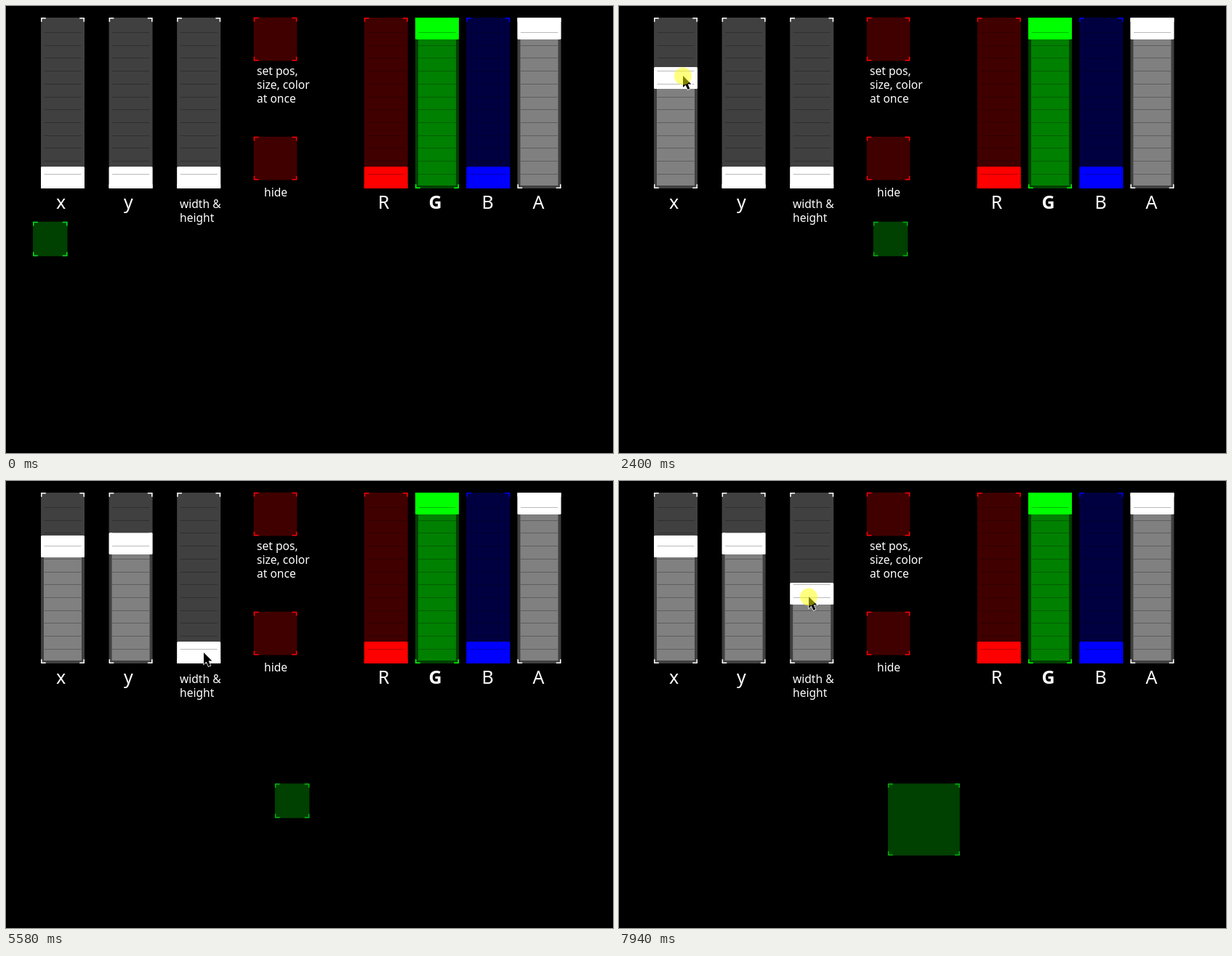
An HTML page with a canvas that plays this animation: 835x615 px, repeating every 8 s.

```html
<!DOCTYPE html>
<html>
<head>
<meta charset="utf-8">
<style>
html, body { margin: 0; width: 100%; height: 100%; overflow: hidden; background: #000; }
canvas { display: block; }
</style>
</head>
<body>
<canvas id="stage" width="835" height="615"></canvas>
<script>
const ctx = document.getElementById('stage').getContext('2d');
const LOOP = 8000, START = 460, TICK = 69.26;
const TOP = 16, BOTTOM = 251, HANDLE = 30, TRAVEL = 205;
const LEAD = 40; // the pointer runs this many ms ahead of the handle

const drags = [
  { slider: 'x', start: 1268, end: 2598, moved: 146, x: 88, soft: 1 },
  { slider: 'y', start: 3497, end: 4614, moved: 150, x: 180, soft: .5 },
  { slider: 'size', start: 5793, end: 7040, moved: 158, x: 262, soft: .5 },
  { slider: 'size', start: 7178, end: LOOP, moved: 75, x: 261, soft: 0 }
];
const moves = [
  { start: START, end: 737, x: 89, y: 237, soft: .5 },
  { start: 2780, end: 3340, x: 176, y: 235, soft: 1 },
  { start: 4890, end: 5580, x: 272, y: 236, soft: 1 }
];
const pointerLegs = [
  ...moves,
  ...drags.map(d => ({ ...d, start: d.start - LEAD, end: d.end - LEAD, y: 236 - d.moved }))
].sort((a, b) => a.start - b.start);
const presses = [[1010, 2740], [3500, 4890], [5780, LOOP]];

// Blend of linear motion and smoothstep.
const ease = (u, soft) => u + soft * (u * u * (3 - 2 * u) - u);

function follow(legs, key, t, value) {
  for (const leg of legs) {
    const u = Math.min(1, Math.max(0, (t - leg.start) / (leg.end - leg.start)));
    value += (leg[key] - value) * ease(u, leg.soft);
  }
  return value;
}

const movedAt = (slider, t) => follow(drags.filter(d => d.slider === slider), 'moved', t, 0);

function rect(x, y, w, h, color, radius = 0) {
  ctx.fillStyle = color;
  ctx.beginPath();
  ctx.roundRect(x, y, w, h, radius);
  ctx.fill();
}

function panel(x, y, w, h, fill, line) {
  rect(x, y, w, h, fill, 1);
  ctx.strokeStyle = line;
  ctx.lineWidth = 1.5;
  ctx.beginPath();
  for (const [cx, dx] of [[x + .75, 6], [x + w - .75, -6]])
    for (const [cy, dy] of [[y + .75, 5], [y + h - .75, -5]]) {
      ctx.moveTo(cx + dx, cy);
      ctx.lineTo(cx, cy);
      ctx.lineTo(cx, cy + dy);
    }
  ctx.stroke();
}

function slider(x, moved, dark, mid, bright) {
  const y = Math.round(BOTTOM - HANDLE - moved), fillTop = y + HANDLE;
  panel(x, TOP, 60, BOTTOM - TOP, dark, bright);
  if (fillTop < 247) rect(x + 4, fillTop, 52, 247 - fillTop, mid);
  rect(x, y, 60, HANDLE, bright, 1.5);
  for (let i = 0; i < 12; i++)
    rect(x + 4.5, Math.round(36 + i * 17.7), 51, 1, 'rgba(0,0,0,.27)');
}

function text(str, x, y, size = 15.6, align = 'left', weight = 400) {
  ctx.font = `${weight} ${size}px "Noto Sans", sans-serif`;
  ctx.textAlign = align;
  ctx.fillStyle = '#fff';
  ctx.fillText(str, x, y);
}

function pointer(x, y, pressed) {
  ctx.beginPath();
  [[0, 0], [0, 16], [3.6, 12.8], [6.6, 19], [9.4, 17.8], [6.6, 11.6], [11.4, 11.4]]
    .forEach(([dx, dy]) => ctx.lineTo(x + dx, y + dy));
  ctx.closePath();
  ctx.strokeStyle = '#fff';
  ctx.lineWidth = 1.4;
  ctx.stroke();
  ctx.fillStyle = '#000';
  ctx.fill();
  if (!pressed) return;
  ctx.fillStyle = 'rgba(255,255,0,.5)';
  ctx.beginPath();
  ctx.arc(x, y + .5, 12, 0, Math.PI * 2);
  ctx.fill();
}

function draw(time) {
  const t = START + Math.floor((time - START + 14) / TICK) * TICK;
  const x = movedAt('x', t), y = movedAt('y', t), size = movedAt('size', t);
  rect(0, 0, 835, 615, '#000');

  [x, y, size].forEach((moved, i) =>
    slider(48 + i * 93.6, moved, '#404040', '#808080', '#fff'));
  slider(492.7, 0, '#400000', '#800000', '#f00');
  slider(563, TRAVEL, '#004000', '#008000', '#0f0');
  slider(633.3, 0, '#000040', '#000080', '#00f');
  slider(703.5, TRAVEL, '#404040', '#808080', '#fff');
  for (const top of [15.8, 179.8]) panel(340.7, top, 59.6, 59.6, '#400000', '#f00');

  ['set pos,', 'size, color', 'at once'].forEach((s, i) => text(s, 345, 95 + i * 19));
  ['width &', 'height'].forEach((s, i) => text(s, 239, 278 + i * 19));
  text('hide', 355, 262);
  [['x', 75.5], ['y', 168.5], ['R', 519.5], ['G', 590.5], ['B', 662.5], ['A', 732.5]]
    .forEach(([s, cx]) => text(s, cx, 279, 25, 'center', s === 'G' ? 700 : 400));

  const side = 47.5 + size * .634;
  panel(37 + x * 2.28, 296.8 + y * .797, side, side, '#004000', x ? '#00b40c' : '#00e41e');

  if (t >= START)
    pointer(Math.round(follow(pointerLegs, 'x', t, 563)),
      Math.round(follow(pointerLegs, 'y', t, 579)),
      presses.some(([from, to]) => t >= from && t < to));
}

const begin = performance.now();
function loop() {
  draw((performance.now() - begin) % LOOP);
  requestAnimationFrame(loop);
}
loop();
</script>
</body>
</html>
```
